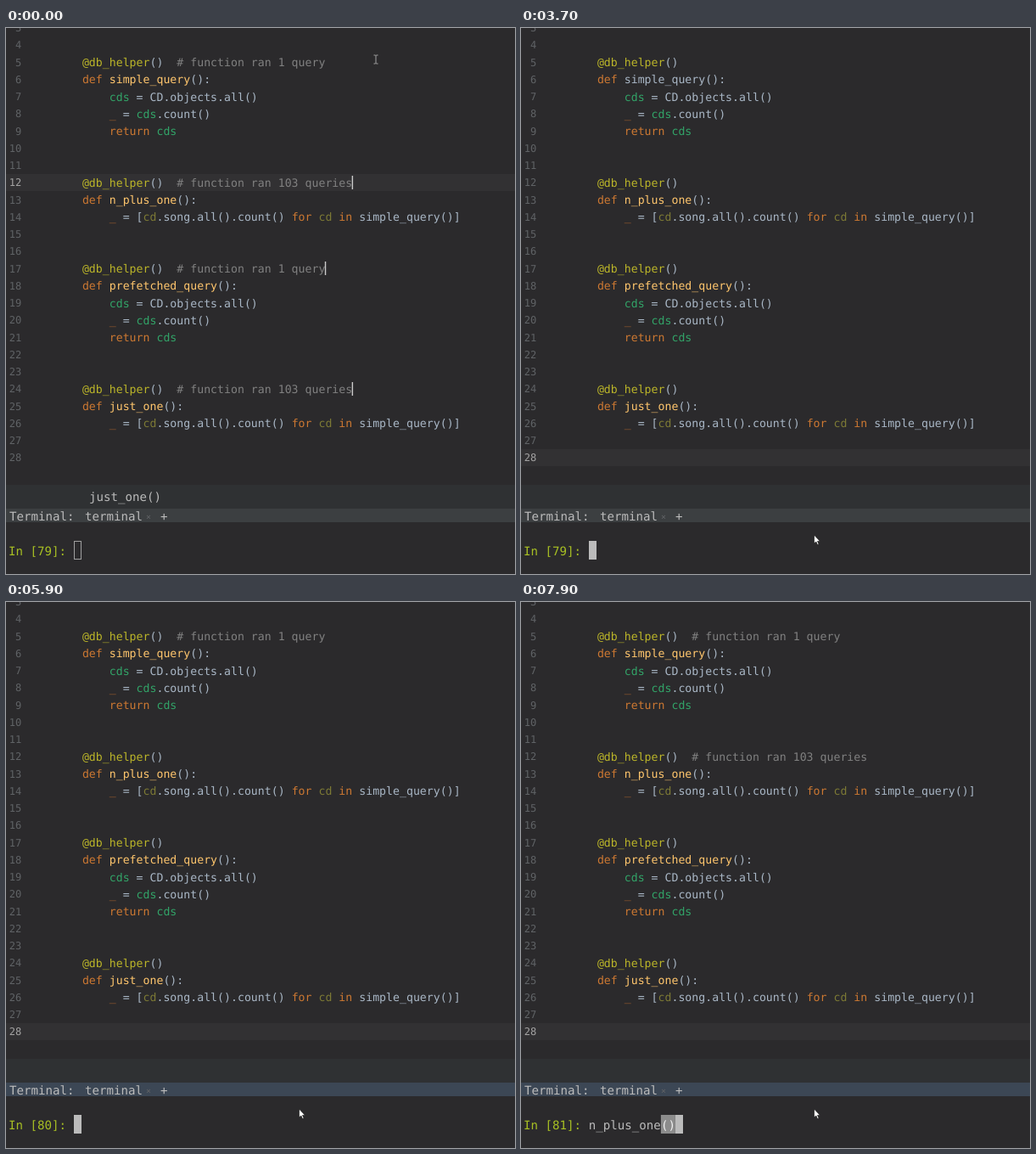
Recreate the animation shown at these times as an HTML page. Size 600 by 643 pixels, loop 8000 ms.

```html
<!DOCTYPE html>
<html lang="en">
<head>
<meta charset="utf-8">
<title>Query counter</title>
<style>
  html, body { margin: 0; width: 100%; height: 100%; overflow: hidden; background: #2b2a2c; }
  svg { display: block; width: 600px; height: 643px; }
  text { font: 13.22px "DejaVu Sans Mono", "Noto Sans Mono", monospace; fill: #a9b7c6; white-space: pre; text-rendering: geometricPrecision; }
  .num { font-size: 12.1px; fill: #606366; text-anchor: end; }
  .num.on { fill: #a4a3a3; }
  .dec { fill: #bbb529; }
  .kw { fill: #cc7832; }
  .blank { fill: #a8622e; }
  .fn { fill: #ffc66d; }
  .fn.plain { fill: #a9b7c6; }
  .cds { fill: #32a468; }
  .cd { fill: #7d7a35; }
  .note { fill: #808080; }
  .match { fill: #ffef28; font-weight: bold; }
  .ui { font-size: 14.15px; fill: #bbbbbb; }
  .prompt { fill: #a8c023; }
  .close { font-size: 10px; fill: #606366; }
</style>
</head>
<body>
<svg id="stage" viewBox="0 0 600 643"></svg>
<script>
const LOOP = 8000, TICK = 100;
const X0 = 26.2, CW = 7.96, ROW = 20.25;   // editor grid
const TX = 3, TW = 8.52;                   // terminal grid
const stage = document.getElementById('stage');

function add(tag, attrs, text) {
  const el = document.createElementNS('http://www.w3.org/2000/svg', tag);
  for (const k in attrs) el.setAttribute(k, attrs[k]);
  if (text !== undefined) el.textContent = text;
  return stage.appendChild(el);
}
const rect = (x, y, width, height, fill) => add('rect', { x, y, width, height, fill });
const label = (x, y, cls, text) => add('text', { x, y, class: cls }, text);
const show = (el, on) => el.setAttribute('visibility', on ? 'visible' : 'hidden');
const put = (el, text) => { if (el.textContent !== text) el.textContent = text; };
const colX = c => X0 + c * CW;
const rowTop = n => Math.round(30.4 + (n - 5) * ROW);
const baseY = n => 45 + (n - 5) * ROW;
const cellX = c => TX + c * TW;

const fetchBody = ['cds = CD.objects.all()', '_ = cds.count()', 'return cds'];
const loopBody = ['_ = [cd.song.all().count() for cd in simple_query()]'];
const blocks = [
  [5, 'simple_query', fetchBody],
  [12, 'n_plus_one', loopBody],
  [17, 'prefetched_query', fetchBody],
  [24, 'just_one', loopBody]
];
const rules = [
  [/^@\w+/, 'dec'], [/^(def|return|for|in)\b/, 'kw'], [/^cds\b/, 'cds'],
  [/^cd\b/, 'cd'], [/^_(?= )/, 'blank'], [/^\w+/, ''], [/^[^\w@]+/, '']
];

// Draws one line as coloured words and returns the function name, if any.
function drawCode(line, col, src) {
  let name = null, afterDef = false;
  while (src) {
    const [re, cls] = rules.find(r => r[0].test(src));
    const word = src.match(re)[0];
    const lead = word.length - word.trimStart().length;
    if (word.trim()) {
      const isName = afterDef && /^\w/.test(word);
      const el = label(colX(col + lead), baseY(line), isName ? 'fn' : cls, word.trim());
      if (isName) name = el;
      afterDef = word === 'def';
    }
    col += word.length;
    src = src.slice(word.length);
  }
  return name;
}

// Editor
const band = rect(0, 0, 600, 20, '#323133');
const matchBox = rect(colX(18), rowTop(5) + 2, 2 * CW, 17, '#3b514d');
const nums = {}, names = {}, notes = {}, carets = {};
const caret = (x, line) => rect(x, rowTop(line) + 2, 1.4, 16, '#cccccc');
for (let n = 3; n <= 28; n++) nums[n] = label(18.3, baseY(n) - .3, 'num', n);
for (const [line, name, body] of blocks) {
  drawCode(line, 8, '@db_helper');
  names[line] = drawCode(line + 1, 8, `def ${name}():`);
  body.forEach((src, i) => drawCode(line + 2 + i, 12, src));
  notes[line] = label(colX(22), baseY(line), 'note', '');
  carets[line] = caret(0, line);
}
const parens = blocks.map(b => label(colX(18), baseY(b[0]), '', '()'));
const endCaret = caret(colX(0), 28);

// Breadcrumb and terminal
rect(0, 538, 600, 28, '#2f3133');
const crumb = label(98, 557, 'ui', '');
const bar = rect(0, 566, 600, 16, '#3c3f41');
label(4, 580, 'ui', 'Terminal:');
label(93, 580, 'ui', 'terminal');
label(165, 579, 'close', '×');
label(182, 580, 'ui', '+');
const prompt = label(TX, 621, 'ui prompt', '');
const pairBox = rect(0, 604, 2 * TW, 22, '#8c8c8c');
const input = label(cellX(9), 621, 'ui', '');
const pair = label(0, 621, 'ui', '()');
pair.style.fill = '#f0f0f0';
const block = rect(0, 604, TW, 22, '#bbbbbb');

// Pointers
const beam = add('path', { d: 'M-2.5-5H-.8L0-4.3L.8-5H2.5M0-4.3V4.3M-2.5 5H-.8L0 4.3L.8 5H2.5', fill: 'none', stroke: '#b0b0b0', 'stroke-width': .9 });
const arrow = add('path', { d: 'M0 0V10L2.3 8L4 11.6L5.6 10.9L4 7.4H7Z', fill: '#ffffff', stroke: '#1c1c1c', 'stroke-width': .7 });

// Each step overrides part of the state from its time onwards.
const steps = [
  [0, { line: 12, cut: 99, caret: 'most', plain: false, crumb: 'just_one()', match: false,
        n: 79, cmd: '', focus: false, blue: false, done: 0 }],
  [100, { line: 5, caret: 'all' }],
  [700, { cut: 3 }],
  [900, { cut: 2 }],
  [1000, { cut: 1.5 }],
  [1100, { cut: 1 }],
  [1200, { plain: true }],
  [1500, { cut: .5 }],
  [1600, { cut: 0, match: true, crumb: 'simple_query()' }],
  [2100, { caret: 'none' }],
  [2400, { caret: 'all' }],
  [2800, { line: 28, caret: 'end', match: false, crumb: '' }],
  [3500, { caret: 'none', focus: true }],
  [3900, { blue: true }],
  [4500, { cmd: 'just_one()' }],
  [4700, { cmd: 'prefetched_query()' }],
  [4900, { cmd: 'n_plus_one()' }],
  [5100, { cmd: 'simple_query()' }],
  [5300, { cmd: '', n: 80 }],
  [5500, { done: 1 }],
  [5700, { plain: false }],
  [6200, { cmd: 'simple_query()' }],
  [6300, { cmd: 'just_one()' }],
  [6500, { cmd: 'prefetched_query()' }],
  [6600, { cmd: 'n_plus_one()' }],
  [7100, { cmd: '', n: 81 }],
  [7300, { done: 2 }],
  [7800, { cmd: 'n_plus_one()' }]
];

// time, x, y
const path = [
  [0, 436, 37], [100, 436, 37], [300, 432.5, 40], [1800, 432.5, 40],
  [2400, 406, 290], [2600, 380.5, 468.5], [2800, 374, 506], [3000, 370, 510],
  [3200, 354, 566], [3500, 345.5, 597], [8000, 345.5, 597]
];

function pointerAt(t) {
  const i = path.findIndex(p => p[0] > t);
  const [a, b] = [path[i - 1], path[i]];
  const k = (t - a[0]) / (b[0] - a[0]);
  return [a[1] + (b[1] - a[1]) * k, a[2] + (b[2] - a[2]) * k];
}

// Comment left after deleting word by word.
function noteText(line, s) {
  const many = line === 12 || line === 24;
  const full = '# function ran ' + (many ? '103 queries' : '1 query');
  if (s.cut === 99) return full;
  if (s.done) return blocks.slice(0, s.done).some(b => b[0] === line) ? full : '';
  if (s.cut === 3) return full.replace(/quer\w+/, '');
  return { 2: '# function ran ', 1.5: '# function ', 1: '# ' }[s.cut] || '';
}

function render(t) {
  const s = Object.assign({}, ...steps.filter(p => p[0] <= t).map(p => p[1]));

  band.setAttribute('y', rowTop(s.line));
  for (const n in nums) nums[n].classList.toggle('on', +n === s.line);
  names[5].classList.toggle('plain', s.plain);
  for (const [line] of blocks) {
    const text = noteText(line, s);
    put(notes[line], text);
    const col = s.cut ? 22 + text.length : 20;
    carets[line].setAttribute('x', colX(col) - .6);
    show(carets[line], s.caret === 'all' || s.caret === 'most' && line !== 5);
  }
  show(matchBox, s.match);
  parens[0].setAttribute('class', s.match ? 'match' : '');
  show(endCaret, s.caret === 'end');
  put(crumb, s.crumb);

  bar.setAttribute('fill', s.blue ? '#3c4755' : '#3c3f41');
  put(prompt, `In [${s.n}]:`);
  put(input, s.cmd.replace('()', ''));
  const end = 9 + s.cmd.length;
  for (const el of [pairBox, pair]) {
    el.setAttribute('x', cellX(end - 2));
    show(el, s.cmd);
  }
  const inset = s.focus ? 0 : .5;
  block.setAttribute('x', Math.round(cellX(end)) + inset);
  block.setAttribute('y', 604 + inset);
  block.setAttribute('width', 9 - 2 * inset);
  block.setAttribute('height', 22 - 2 * inset);
  block.setAttribute('fill', s.focus ? '#bbbbbb' : 'none');
  block.setAttribute('stroke', s.focus ? 'none' : '#a0a0a0');

  const [x, y] = pointerAt(t);
  const overEditor = y < 538;
  for (const el of [beam, arrow]) el.setAttribute('transform', `translate(${x} ${y})`);
  show(beam, overEditor && (t < 1800 || t >= 2400));
  show(arrow, !overEditor);
}

const start = performance.now();
function frame() {
  const t = (performance.now() - start) % LOOP;
  render(Math.floor(t / TICK) * TICK);
  requestAnimationFrame(frame);
}
frame();
</script>
</body>
</html>
```
